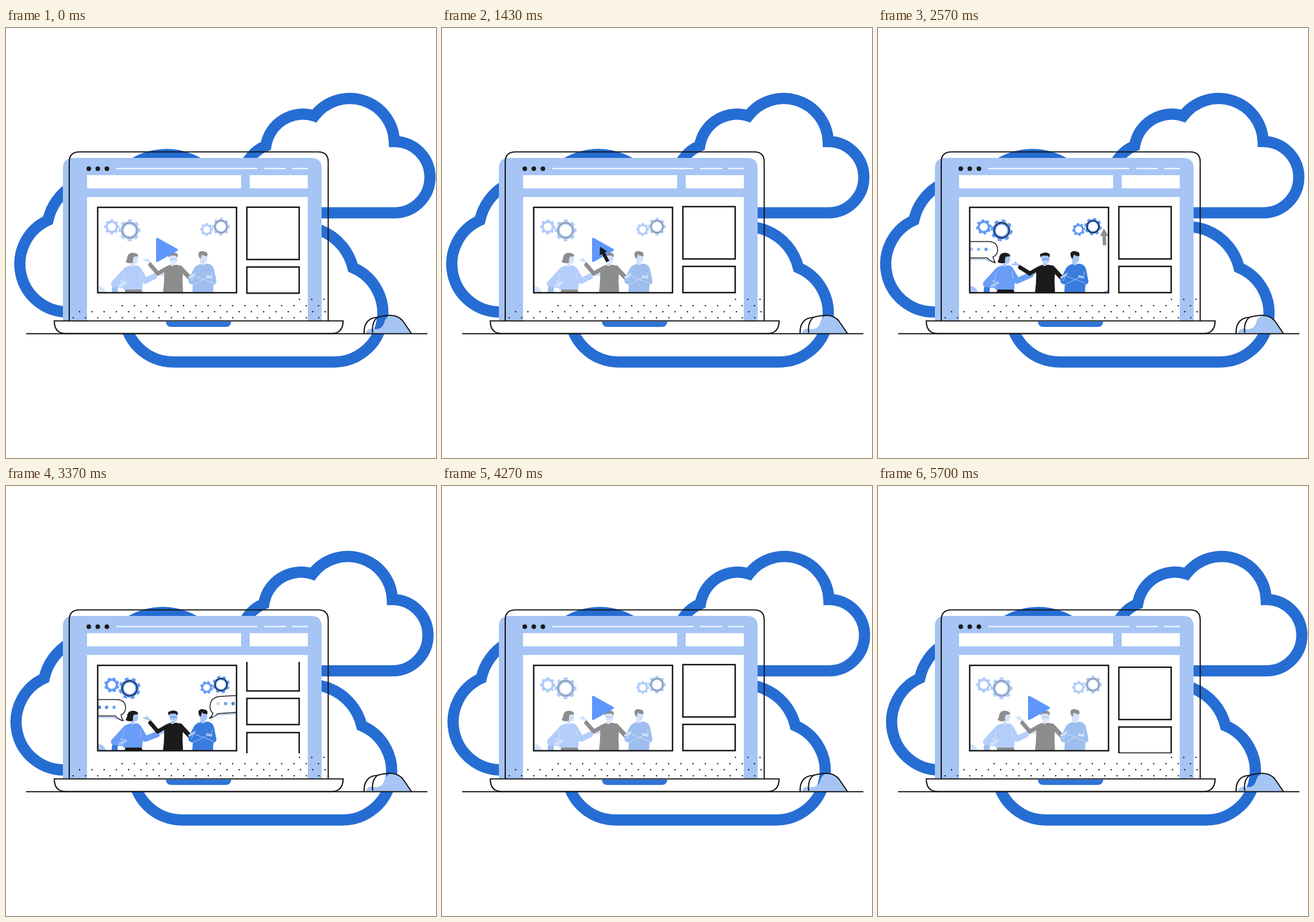
Write an HTML page that moves like this. It is 748 by 748 pixels and loops after 5730 ms.

```html
<!DOCTYPE html>
<html lang="en">
<head>
<meta charset="utf-8">
<title>Cloud video laptop</title>
<style>
  html, body { margin: 0; width: 100%; height: 100%; overflow: hidden; background: #fff; }
  svg { display: block; width: 100%; height: 100%; }
  .cloud { fill: none; stroke: #266dd3; stroke-width: 19.5; stroke-miterlimit: 8; }
  .ink { fill: none; stroke: #141414; stroke-width: 2.1; }
  .frame { fill: none; stroke: #141414; stroke-width: 2.5; }
  .pale { fill: #a6c5f5; }
  .mid { fill: #699df7; }
  .deep { fill: #3a7cde; }
  .dark { fill: #1b1b1b; }
  .limb { fill: none; stroke-linecap: round; stroke-linejoin: round; }
  .thin { fill: none; stroke: #a6c5f5; stroke-width: 1; }
  .bubble { fill: #fff; stroke: #1b1b1b; stroke-width: 1.5; stroke-linejoin: round; }
</style>
</head>
<body>
<svg viewBox="0 0 748 748">
  <defs>
    <clipPath id="videoClip"><rect x="160" y="312" width="241" height="148"/></clipPath>
    <clipPath id="thumbClip"><rect x="415" y="306" width="100" height="159"/></clipPath>
  </defs>

  <g class="cloud">
    <path id="cloudTop" d="M413 250A66 66 0 0 1 452 205A65.3 65.3 0 0 1 536.5 153A77.5 77.5 0 0 1 675.5 197.500A62 62 0 0 1 675.5 321.5H440"/>
    <path id="cloudLeft" d="M150 494H107.5A83.5 83.5 0 0 1 73 334.5A92.5 92.5 0 0 1 195 267M200 253.5A110 110 0 0 1 389 330"/>
    <path id="cloudLow" d="M460 362A93 93 0 0 1 603.5 417A85.4 85.4 0 0 1 570 581H291A85.5 85.5 0 0 1 205.5 495.5"/>
  </g>

  <path class="pale" d="M99 509V244Q99 226 117 226H531Q549 226 549 244V509Z"/>
  <g fill="#fff">
    <path d="M141 256H409V279H141ZM424 256H525V279H424ZM141 294H525V509H141Z"/>
    <path d="M192 244.5H437M449 244.5H487M498 244.5H525" stroke="#fff" stroke-width="2.2"/>
  </g>
  <g class="dark"><circle cx="144" cy="244.7" r="4"/><circle cx="159.7" cy="244.7" r="4"/><circle cx="175.5" cy="244.7" r="4"/></g>
  <g id="dots" class="dark"></g>
  <path class="ink" d="M110 509V233Q110 215.5 128 215.5H543Q560.5 215.5 560.5 233V509"/>

  <g id="video" clip-path="url(#videoClip)">
    <g id="gears"></g>
    <path class="pale" d="M161 449Q170 449 174 460H161Z"/>
    <path class="deep" d="M184 460Q183 447 191 444L195 449L194 460Z"/>

    <g id="woman">
      <path class="limb" d="M210 421L188 445L200 447" stroke="#699df7" stroke-width="11"/>
      <path class="dark" d="M208 453H235L238 461H206Z"/>
      <path class="mid" d="M202 423Q207 414 218 413H229Q236 416 239 428L237 455H204Q200 440 202 423Z"/>
      <path class="limb" d="M198 449L208 443" stroke="#a6c5f5" stroke-width="5"/>
      <path id="sleeve" class="limb" stroke="#699df7" stroke-width="10"/>
      <path id="hand" class="limb" stroke="#a6c5f5" stroke-width="3.5"/>
      <path class="thin" d="M206 424Q202 436 204 451M233 424L235 437"/>
      <path class="pale" d="M219 395H229L230 402L228 409L223 410V415H217Z"/>
      <path class="dark" d="M208 407Q211 402 211 398Q213 390 222 391Q230 392 230 397L222 398Q220 403 221 408Q214 411 208 407Z"/>
    </g>

    <g id="speaker">
      <g id="forearm">
        <path class="limb" d="M252 408L240 403M249 407L245 401" stroke="#a6c5f5" stroke-width="3"/>
        <path class="limb" d="M264 427L251 412" stroke="#1b1b1b" stroke-width="7"/>
      </g>
      <path class="limb" d="M280 418L264 427" stroke="#1b1b1b" stroke-width="7"/>
      <path class="limb" d="M303 417L318 433" stroke="#1b1b1b" stroke-width="8"/>
      <path class="dark" d="M275 419Q278 414 286 412H298Q305 413 308 420L307 440L308 461H273Q276 440 275 419Z"/>
      <path class="pale" d="M284 396H298V404Q297 410 292 411V414H287V409Q284 406 284 396Z"/>
      <path class="dark" d="M283 399Q280 393 285 392Q291 389 297 392Q300 394 298 399L295 396H286Z"/>
      <path d="M287 407Q291 410 296 406" fill="none" stroke="#fff"/>
      <path d="M286 402H297" fill="none" stroke="#3a7cde"/>
    </g>

    <g id="listener">
      <path class="deep" d="M327 418Q332 411 341 410H352Q360 412 362 420L366 440Q366 446 361 446L360 461H324L325 446Q317 446 317 438L322 428Z"/>
      <path class="thin" d="M330 425L322 440M329 432L361 444M326 446L354 432M359 424L357 433"/>
      <path class="limb" d="M319 434L327 429M350 432L357 434" stroke="#a6c5f5" stroke-width="4"/>
      <path class="pale" d="M337 395H350V403Q348 409 344 409L348 411L341 413L338 409Z"/>
      <path class="dark" d="M338 402Q334 397 335 391Q339 386 345 389Q352 389 350 397Q344 397 341 394Z"/>
    </g>

    <g id="bubbleLeft">
      <path class="bubble" d="M150 371.500H193Q208 372 208 386Q208 395 200 398Q201 404 204 408.500Q195 406 190 400H150Z"/>
      <path d="M160 402.5H188L195 406" fill="none" stroke="#a6c5f5" stroke-width="2"/>
    </g>
    <g id="bubbleRight">
      <path class="bubble" d="M410 364L373 366Q357 367 355 381Q354 391 360 395Q359 400 354 404Q363 402 368 396L410 393Z"/>
      <path d="M360 403L369 398L402 396" fill="none" stroke="#a6c5f5" stroke-width="2"/>
    </g>
    <path id="leaf" class="pale" d="M392 460Q396 455 402 456V460Z"/>
    <rect id="veil" x="160" y="312" width="241" height="148" fill="#fff"/>
    <path id="play" d="M263 367L297 386L263 405Z" fill="#5e97fb" stroke="#5e97fb" stroke-width="4" stroke-linejoin="round"/>
  </g>
  <rect class="frame" x="159.5" y="312" width="241.5" height="148.5"/>
  <g clip-path="url(#thumbClip)"><path id="thumbs" class="frame"/></g>
  <path id="cursor" class="dark" d="M0 0L7.5 13L3 12.5L3.2 29H-2.8L-3 12.5L-7.5 13Z"/>

  <path d="M84 509.5H586.5Q586 531.5 566 531.5H104Q84 531.5 84 509.5Z" fill="#fff" stroke="#141414" stroke-width="2.1"/>
  <path d="M278 510.5H392Q391 520 382 520H288Q279 520 278 510.5Z" fill="#2f74d6"/>
  <path class="pale" d="M627 531Q627 523 636 523Q654 527 658 512Q661 501 671 500Q685 501 692 511L705 531Z"/>
  <path class="ink" d="M623 531C622 513 632 504 645 503.5C655 501 664 499 671 500Q685 501 692 512L705 531M638 530C636 518 640 508 646 503.5M35 531.7H733"/>
</svg>

<script>
const LOOP = 5730;
const $ = id => document.getElementById(id);
const set = (id, attrs) => {
  for (const key in attrs) $(id).setAttribute(key, attrs[key]);
};
const clamp = v => Math.max(0, Math.min(1, v));
const ease = (t, start, length) => (1 - Math.cos(Math.PI * clamp((t - start) / length))) / 2;
const mix = (a, b, k) => a + (b - a) * k;
const shift = (id, x, y = 0) => set(id, { transform: `translate(${x} ${y})` });

// Halftone rows: y, first x, last x
const PITCH = 21.35;
const rows = [[472, 510.5, 555], [483, 202, 546], [493.5, 128, 556], [504, 117, 546]];
$('dots').innerHTML = rows.map(([y, from, to]) => {
  let row = '';
  for (let x = from; x < to; x += PITCH) row += `<circle cx="${x}" cy="${y}" r="1.2"/>`;
  return row;
}).join('');

// Gears: x, y, outer radius, has a dark ring, direction
const gears = [[184, 346, 13.2, 0, 1], [215, 352, 19, 1, -1], [349, 350.5, 11.2, 0, 1], [374, 345.5, 15.3, 1, -1]];
$('gears').innerHTML = gears.map(([x, y, r, ringed], i) => {
  const tooth = 2 * Math.PI * r * 0.88 / 16;
  const ring = ringed ? `<circle r="${r * 0.69}" fill="none" stroke="#1b1b1b" stroke-width="1.6"/>` : '';
  return `<g id="gear${i}" fill="none" stroke="#5f98f8">
    <circle r="${r * 0.88}" stroke-width="${r * 0.24}" stroke-dasharray="${tooth}"/>
    <circle r="${r * 0.68}" stroke-width="${r * 0.3}"/>${ring}</g>`;
}).join('');

const typingDots = (bubble, xs, y) => {
  $(bubble).innerHTML += xs.map((x, i) =>
    `<circle id="${bubble}${i}" cx="${x}" cy="${y}" r="2.9" fill="#3f82ea"/>`).join('');
};
typingDots('bubbleLeft', [162.5, 175, 188], 385);
typingDots('bubbleRight', [369, 382, 395], 378.5);

const thumbPath = offset => {
  let d = '';
  for (let k = 0; k < 3; k++) {
    const y = 310.7 + offset + (k - 1) * 163.5;
    d += `M419 ${y}h91v91h-91ZM419 ${y + 104}h91v45.5h-91Z`;
  }
  return d;
};

function drawClouds(t) {
  const clock = t < 3600 ? t : Math.max(3600, t - 50);
  const sway = 1 - Math.cos(2 * Math.PI * clock / 1918);
  shift('cloudTop', -3.6 * sway);
  shift('cloudLeft', -6.9 * sway);
  shift('cloudLow', 16 * sway);
}

function drawVideo(t) {
  const live = ease(t, 1650, 200) - ease(t, 3900, 200);
  set('veil', { opacity: 0.5 * (1 - live) });
  set('play', { opacity: 1 - live });

  const turn = 90 * clamp((t - 1650) / 2400);
  gears.forEach(([x, y, r, ringed, way], i) =>
    set('gear' + i, { transform: `translate(${x} ${y}) rotate(${way * turn - 11.25})` }));

  const gesture = live * (1 - Math.cos(2 * Math.PI * (t - 1770) / 1600)) / 2;
  set('forearm', { transform: `rotate(${-17 * gesture} 264 427)` });
  const wrist = 262 + 5 * live + 3 * gesture;
  const lift = 3 * gesture;
  set('sleeve', { d: `M231 421L242 440L${wrist - 4} ${432 - lift}` });
  set('hand', {
    d: `M${wrist} 431l6 -3l7 -1.5M${wrist + 6} 429l5 1`,
    transform: `translate(0 ${-lift})`
  });

  const gone = ease(t, 3850, 200);
  shift('bubbleLeft', -55 * (1 - ease(t, 2100, 300) + gone));
  shift('bubbleRight', 55 * (1 - ease(t, 2800, 300) + gone));
  for (let i = 0; i < 3; i++) {
    set('bubbleLeft' + i, { opacity: 0.75 + 0.25 * Math.cos((t - 3370) / 260 - i * 0.9) });
    set('bubbleRight' + i, { opacity: 0.6 + 0.4 * Math.cos((t - 3370) / 260 + (2 - i) * 1.2) });
  }
  set('leaf', { opacity: ease(t, 2350, 150) - ease(t, 2700, 150) });
}

function drawCursor(t) {
  const near = ease(t, 900, 420) - ease(t, 1950, 600);
  const press = 1 - 0.15 * Math.sin(Math.PI * clamp((t - 1520) / 200));
  const x = mix(393, 275, near), y = mix(349, 380.5, near);
  set('cursor', {
    transform: `translate(${x} ${y}) rotate(${mix(-2, -27, near)}) scale(${press})`,
    opacity: ease(t, 900, 180) - ease(t, 2500, 140)
  });
}

function drawThumbs(t) {
  const settle = t < 100 ? t + LOOP : t;
  const moved = ease(settle, 3195, 500) + ease(settle, 5255, 500);
  set('thumbs', { d: thumbPath(-163.5 * (moved % 1)) });
}

function render(now) {
  const t = now % LOOP;
  drawClouds(t);
  drawVideo(t);
  drawCursor(t);
  drawThumbs(t);
}

const start = performance.now();
function tick() {
  render(performance.now() - start);
  requestAnimationFrame(tick);
}
tick();
</script>
</body>
</html>
```
